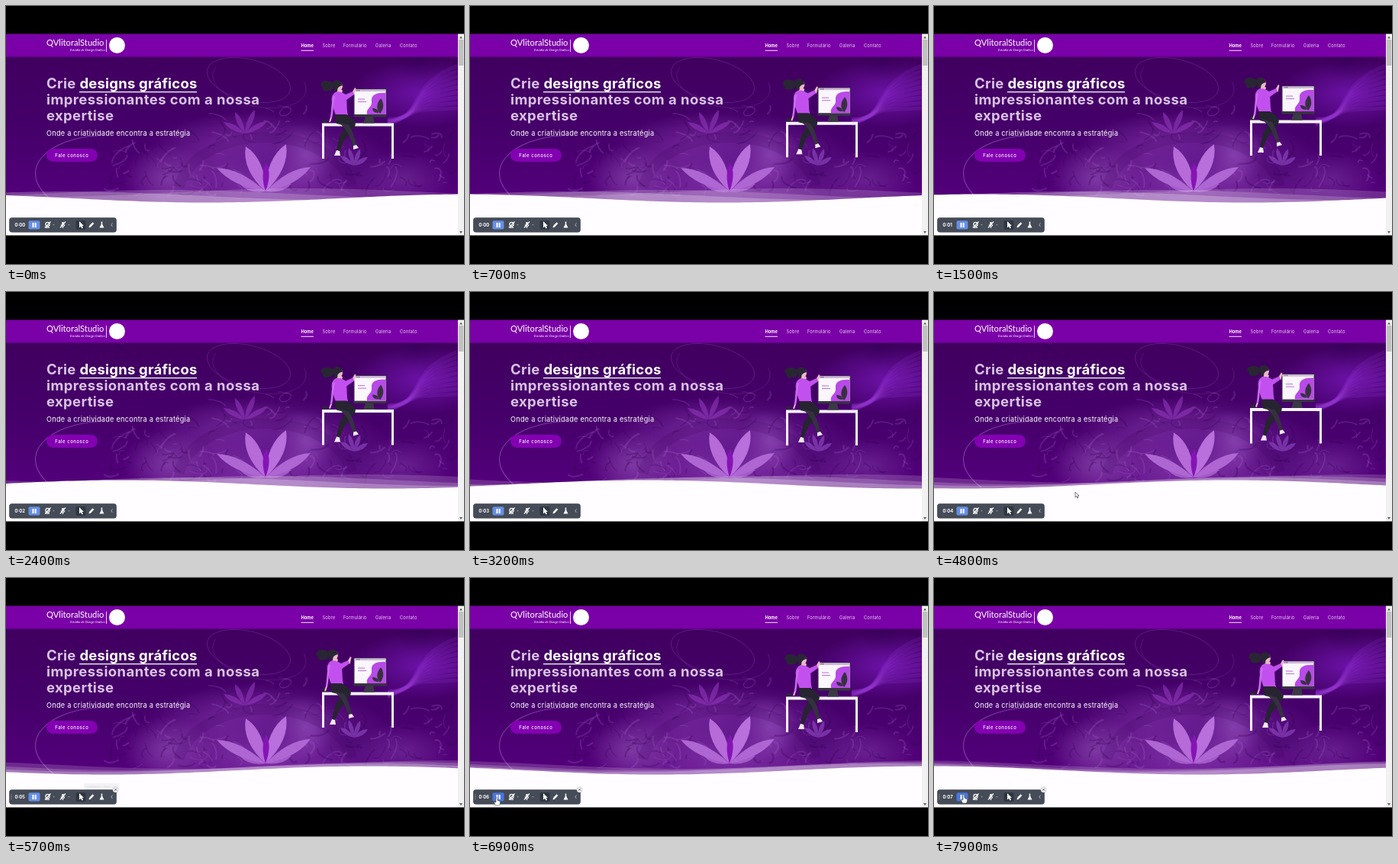
Animation of 600x338 px, one loop 8000 ms. Source, as an HTML page with a canvas:

```html
<!DOCTYPE html>
<html lang="pt">
<head>
<meta charset="utf-8">
<style>
html, body { margin: 0; width: 100%; height: 100%; overflow: hidden; background: #000; }
canvas, svg { position: absolute; left: 0; top: 0; width: 600px; height: 338px; }
text { font-family: Inter, "Open Sans", sans-serif; fill: #fff; white-space: pre; }
.title { font-size: 18.5px; font-weight: 700; letter-spacing: .35px; fill: #d9c3e6; }
.nav { font-size: 5.7px; letter-spacing: .2px; fill: #ead2f3; }
</style>
</head>
<body>
<canvas id="bg" width="600" height="338"></canvas>
<svg viewBox="0 0 600 338">
  <!-- header -->
  <rect y="36" width="592" height="30.6" fill="#7a00a7"/>
  <text x="53" y="51.5" style="font: 400 11.2px Lato, sans-serif">QVlitoralStudio</text>
  <text x="84" y="59" style="font: italic 4.3px Lato, sans-serif">Estúdio de Design Gráfico</text>
  <path d="M131.5 44V60" stroke="#fff" stroke-width=".8"/>
  <circle cx="145.5" cy="51.5" r="10.5" fill="#fff"/>
  <text class="nav" x="386.5" y="53.7" style="font-weight:700;fill:#fff;letter-spacing:0">Home</text>
  <text class="nav" x="414.5" y="53.7">Sobre</text>
  <text class="nav" x="442" y="53.7">Formulário</text>
  <text class="nav" x="484" y="53.7">Galeria</text>
  <text class="nav" x="516" y="53.7">Contato</text>
  <path d="M386.5 58.3H403" stroke="#fff" stroke-width=".9"/>

  <!-- hero copy -->
  <text class="title" x="53" y="108">Crie <tspan fill="#fff" letter-spacing=".2">designs gráficos</tspan></text>
  <path d="M96 112.6H250" stroke="#fff" stroke-width="1.1"/>
  <text class="title" x="53" y="129" style="letter-spacing:.43px">impressionantes com a nossa</text>
  <text class="title" x="53" y="150">expertise</text>
  <text x="53" y="170" font-size="9.2" letter-spacing=".23">Onde a criatividade encontra a estratégia</text>
  <rect x="53" y="187" width="67" height="17" rx="8.5" fill="#8300b2"/>
  <text x="64.3" y="197.6" font-size="6" font-weight="500" letter-spacing=".5">Fale conosco</text>

  <!-- desk scene -->
  <g id="desk">
    <path d="M414 153.5H508V200H505V157.5H417V200H414Z" fill="#f7f2fa"/>
    <path d="M414.5 153V149H420V153Z" fill="#292735"/>
    <path d="M471 145H481L483 153.5H468Z" fill="#3b3945"/>
    <rect x="455.5" y="108.5" width="43" height="37" rx="1" fill="#383542"/>
    <rect x="456.5" y="109.5" width="41" height="32.5" fill="#fbf6fd"/>
    <rect x="456.5" y="109.5" width="41" height="2.5" fill="#cdb9d8"/>
    <path d="M473 142C471 134 480 133 479 125S484 113 497.500 114V142Z" fill="#b84ae8"/>
    <path d="M490 141C484 134 486 127 491 121C496 128 495 135 490 141M488 140C482 140 480 137 480 134C485 134 488 136 488 140" fill="#37313f"/>
    <path d="M461 122H470M461 125.500H472" stroke="#ba71dc"/>
    <circle cx="460" cy="110.800" r=".7" fill="#5d356e"/><circle cx="462.500" cy="110.800" r=".7" fill="#5d356e"/>
  </g>
  <g id="girl">
    <path d="M432 113L437 107L441 111L439 117Z" fill="#e9b9c9"/>
    <ellipse cx="436.500" cy="105" rx="4.500" ry="5.500" fill="#e9b9c9"/>
    <path d="M441 104C439 96 431 95 428 101C423 96 413 98 413 102C411 103 413 106 415 106C413 109 418 113 421 111C427 112 429 107 430 105C429 112 432 114 434 112C434 106 437 105 441 104Z" fill="#292633"/>
    <path d="M430 114C424 119 427 130 432 143H448C446 135 447 127 446 123L456 116L454 112L445 116C440 112 433 111 430 114Z" fill="#c250ee"/>
    <path d="M454 112L457 107L458.500 108L456.500 117Z" fill="#e9b9c9"/>
    <path d="M430 118C427 127 428 136 426 146" fill="none" stroke="#ce6bf3" stroke-width="2.500"/>
    <path d="M426 146L424 152" stroke="#e9b9c9" stroke-width="2"/>
    <path d="M431 142H446C455 148 460 151 457 158L443 176L437 190L433 188L437 171L445 157L433 154Z" fill="#262430"/>
    <path d="M435 152C442 158 447 163 449 169L455 184L459 182L454 165L449 156Z" fill="#353140"/>
    <path d="M433 189L437 190L438 196H430ZM455 183L459 182L462 186L455 188Z" fill="#f2e8f5"/>
  </g>

  <g id="waves"></g>

  <!-- scrollbar -->
  <rect x="592" y="36" width="8" height="265" fill="#f1f1f1"/>
  <rect x="592.8" y="44" width="6.6" height="34" fill="#c1c1c1"/>
  <path d="M594 42.5L596 39.5L598 42.5ZM594 295L596 298L598 295Z" fill="#606060"/>

  <!-- recorder bar -->
  <g id="hint">
    <rect x="102" y="269" width="46" height="8" rx="1" fill="#f2f2f4"/>
    <text x="106" y="274.5" font-size="4" style="fill:#dedee2">Destacar cursor</text>
  </g>
  <rect x="4.5" y="277.5" width="140" height="18.7" rx="3" fill="#454b57" stroke="#3b414c" stroke-width=".6"/>
  <text id="clock" x="11.4" y="288.8" font-size="5.9" font-weight="700"></text>
  <rect id="pause" x="29.5" y="281.3" width="15" height="11.2" rx="2"/>
  <path d="M35.5 284V290M38.7 284V290" stroke="#fff" stroke-width="2"/>
  <g fill="none" stroke="#fff" stroke-width="1.2">
    <circle cx="54.5" cy="286" r="2.6"/><path d="M52 290.2H57M51 290.5L58.5 282.5"/>
    <path d="M74.5 283V287" stroke-width="2.4"/><path d="M72 286.5Q74.5 291 77 286.5M74.5 288.5V291M71 290.5L78 282.5"/>
  </g>
  <path d="M61.5 286.3H63.5L62.5 287.6ZM81.5 286.3H83.5L82.5 287.6Z" fill="#c7cbd2"/>
  <rect x="91.5" y="281" width="13" height="12" rx="2" fill="#303642"/>
  <path d="M96 282V290.5L98 288.7L99.500 291.5L101 290.7L99.6 288.1H102ZM108.5 290.5L109 288L113.5 283.2L115.3 285L110.8 289.8ZM124.7 282.5H126.2V286L128.5 290.5H122.5L124.7 286Z" fill="#fff"/>
  <path d="M139.5 284.5L137.7 286.8L139.5 289" fill="none" stroke="#c7cbd2" stroke-width=".8"/>
  <g id="hover">
    <path d="M7 283.5V291" stroke="#9ca2ad" stroke-width="1.4" stroke-dasharray="1 1.5"/>
    <circle cx="143.5" cy="277.3" r="3.6" fill="#fff" stroke="#9296a0" stroke-width=".5"/>
    <path d="M142 275.8L145 278.8M145 275.8L142 278.8" stroke="#333" stroke-width=".8"/>
  </g>
  <path id="arrow" d="M0 0V7L1.7 5.5L2.8 8L4 7.4L2.9 5H5Z" fill="#fff" stroke="#222" stroke-width=".6"/>
  <path id="hand" d="M-1 0Q0-1 1 0V3.4L4 4.2Q5 5 4.3 8L3.5 10H-1.5L-3.5 6Q-3 5-1 5.8Z" fill="#fff" stroke="#333" stroke-width=".5"/>
  <path d="M0 0H600V36.6H0ZM0 300.4H600V338H0Z" fill="#000"/>
</svg>
<script>
const $ = id => document.getElementById(id);
const g = $('bg').getContext('2d');
let seed = 7;
const rnd = () => (seed = seed * 16807 % 2147483647) / 2147483647;

function glow(x, y, rx, ry, rgb, a) {
  g.save();
  g.translate(x, y);
  g.scale(rx, ry);
  const s = g.createRadialGradient(0, 0, 0, 0, 0, 1);
  s.addColorStop(0, `rgba(${rgb},${a})`);
  s.addColorStop(1, `rgba(${rgb},0)`);
  g.fillStyle = s;
  g.fillRect(-1, -1, 2, 2);
  g.restore();
}

function petal(x, y, tx, ty, w, color) {
  const dx = tx - x, dy = ty - y, n = Math.hypot(dx, dy), nx = -dy / n * w, ny = dx / n * w;
  g.beginPath();
  g.moveTo(x, y);
  for (const [px, py, s] of [[tx, ty, 1], [x, y, -1]])
    g.quadraticCurveTo(x + dx * .6 + nx * s, y + dy * .6 + ny * s, px, py);
  g.fillStyle = color;
  g.fill();
}

function stroke(color, w) {
  g.strokeStyle = color;
  g.lineWidth = w;
  g.stroke();
}

function ring(x, y, rx, ry, rot, from, to, color, w) {
  g.beginPath();
  g.ellipse(x, y, rx, ry, rot, from, to);
  stroke(color, w);
}

// Short soft curls scattered over a box
function wisps(count, x, y, w, h) {
  for (let i = 0; i < count; i++) {
    const r = 5 + rnd() * 16, from = rnd() * 6;
    ring(x + rnd() * w, y + rnd() * h, r, r * .5, rnd() * 3, from, from + 1 + rnd(),
      i % 2 ? 'rgba(48,0,80,.28)' : 'rgba(170,105,210,.24)', .8 + rnd() * 1.6);
  }
}

function paintHero() {
  g.fillStyle = '#fffdff';
  g.fillRect(0, 36, 592, 265);
  g.save();
  g.beginPath();
  g.rect(0, 66, 592, 194);
  g.clip();
  const base = g.createLinearGradient(0, 66, 0, 260);
  base.addColorStop(0, '#40005f');
  base.addColorStop(.5, '#45006a');
  base.addColorStop(1, '#54007c');
  g.fillStyle = base;
  g.fillRect(0, 66, 592, 194);

  // Haze around the flower
  glow(340, 225, 175, 90, '160,85,200', .6);
  glow(300, 178, 110, 38, '140,60,180', .35);
  glow(212, 226, 60, 45, '165,105,200', .45);
  glow(392, 195, 40, 42, '175,110,215', .45);
  glow(520, 228, 65, 38, '150,90,190', .35);
  glow(450, 215, 50, 35, '60,4,100', .4);
  glow(340, 205, 65, 38, '80,5,125', .45);
  ring(340, 250, 115, 78, 0, 3.3, 6.1, 'rgba(60,0,95,.18)', 14);
  wisps(70, 375, 165, 210, 80);
  wisps(70, 140, 175, 170, 70);
  wisps(20, 270, 130, 110, 40);

  // Violet ribbons at the right
  glow(545, 115, 95, 45, '125,25,195', .7);
  for (let i = 0; i < 9; i++) {
    g.beginPath();
    g.moveTo(500, 148 + i);
    g.bezierCurveTo(550, 150 - i * 2, 520, 105 + i * 4, 592, 78 + i * 7);
    stroke('rgba(160,65,225,.14)', 5);
  }
  glow(540, 70, 35, 28, '50,0,85', .5);

  // Thin light trails
  g.beginPath();
  g.moveTo(120, 170);
  g.bezierCurveTo(62, 172, 5, 212, 62, 256);
  stroke('rgba(185,112,218,.5)', 1.1);
  ring(318, 97, 56, 27, .25, 0, 6.3, 'rgba(185,112,218,.3)', .8);
  ring(332, 100, 62, 32, .2, -.4, 3.4, 'rgba(170,90,210,.28)', .8);
  ring(366, 138, 8, 5, -.5, 0, 6.3, 'rgba(185,112,218,.35)', .9);

  for (const [x, y] of [[285, 152], [300, 139], [326, 136], [342, 151]])
    petal(313, 167, x, y, 7, 'rgba(140,50,182,.65)');
  for (const [x, y] of [[438, 196], [449, 186], [464, 187], [474, 198]])
    petal(456, 209, x, y, 6, 'rgba(140,70,190,.65)');
  for (const [x, y, w, c] of [[307, 234, 9, '#a35ac9'], [374, 233, 9, '#a35ac9'],
    [276, 212, 13, '#ae66d3'], [399, 211, 13, '#ae66d3'],
    [314, 184, 17, '#b66bd8'], [367, 181, 17, '#b96fdc'], [341, 205, 8, '#8614b5']])
    petal(340, 243, x, y, w, c);
  g.restore();
}

// Each layer: crest position at start, speed in px/s, crest height, opacity
const layers = [[390, 34, 239, .16], [210, 53, 241, .18], [80, 69, 243, .24], [-85, 98.5, 246.5, 1]];
const paths = layers.map(([, , , alpha]) => {
  const p = document.createElementNS('http://www.w3.org/2000/svg', 'path');
  p.setAttribute('fill', '#fffdff');
  p.setAttribute('fill-opacity', alpha);
  return $('waves').appendChild(p);
});

function wave([start, speed, top], t) {
  let d = 'M0 301';
  for (let x = 0; x <= 592; x += 8)
    d += `L${x} ${(top + 5.5 - 5.5 * Math.cos((x - start - speed * t) * 2 * Math.PI / 695)).toFixed(2)}`;
  return d + 'V301Z';
}

// Eased value along rows of [time, ...values]
function along(rows, t) {
  const i = rows.findIndex(r => r[0] > t);
  if (i < 0) return rows[rows.length - 1].slice(1);
  if (!i) return rows[0].slice(1);
  const a = rows[i - 1], b = rows[i], k = (1 - Math.cos(Math.PI * (t - a[0]) / (b[0] - a[0]))) / 2;
  return a.slice(1).map((v, j) => v + (b[j + 1] - v) * k);
}
const bob = [[0, -4], [.9, .6], [1.2, 2], [2.2, 0], [2.7, 0], [4.2, -4]];
const pointer = [[3.6, 285, 225], [3.9, 250, 243], [4.8, 185, 262], [5.5, 101, 290], [6.6, 37, 288], [6.9, 35, 288], [7.9, 39, 285]];

const move = (id, x, y) => $(id).setAttribute('transform', `translate(${x} ${y})`);
const show = (id, on) => $(id).style.display = on ? '' : 'none';

function draw(now) {
  const t = Math.floor(now % 8000 / 100) / 10;
  layers.forEach((l, i) => paths[i].setAttribute('d', wave(l, t)));
  const [y] = along(bob, (t + 2.7) % 4.2);
  move('desk', 0, y);
  move('girl', Math.min(0, y) * 1.5, y);
  $('clock').textContent = '0:0' + Math.floor(t);
  const [px, py] = along(pointer, t), onPause = t >= 6.4;
  move('arrow', px, py);
  move('hand', px, py);
  show('arrow', t >= 3.6 && t < 5.5);
  show('hand', onPause);
  show('hover', t >= 5.4);
  show('hint', t >= 5.5 && t < 6);
  $('pause').setAttribute('fill', onPause ? '#4777df' : '#6490e4');
  requestAnimationFrame(draw);
}
paintHero();
requestAnimationFrame(draw);
</script>
</body>
</html>
```
